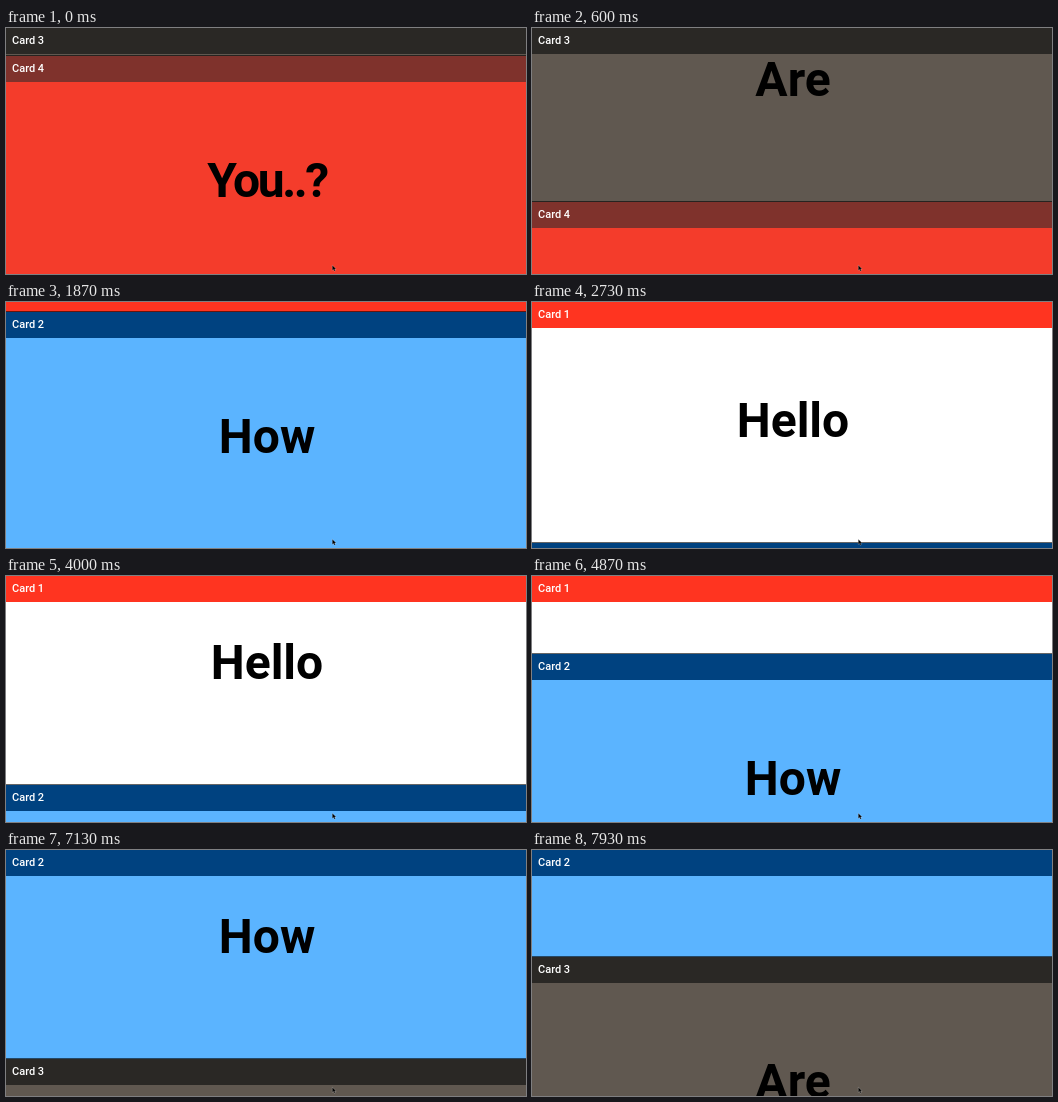
These frames come from a looping animation (520x246 px, 8000 ms). An HTML page:

```html
<!DOCTYPE html>
<html lang="en">
<head>
<meta charset="utf-8">
<title>Sticky cards</title>
<style>
  html, body { margin: 0; width: 100%; height: 100%; overflow: hidden; background: #fff; }
  svg { display: block; width: 520px; height: 246px; }
  text { font-family: Roboto, "Open Sans", sans-serif; }
  .label { font-size: 11px; font-weight: 500; fill: #fff; }
  .word { font-size: 48px; font-weight: 600; text-anchor: middle; fill: #000; }
</style>
</head>
<body>
<svg id="stage" viewBox="0 0 520 246"></svg>
<script>
const WIDTH = 520, CARD = 247, HEADER = 26, LOOP = 8000, RATE = 15;
const stage = document.getElementById('stage');

function add(parent, tag, attrs = {}, text = '') {
  const node = document.createElementNS('http://www.w3.org/2000/svg', tag);
  for (const key in attrs) node.setAttribute(key, attrs[key]);
  node.textContent = text;
  return parent.appendChild(node);
}

const cards = [
  { word: 'Hello', bar: '#ff3420', body: '#ffffff' },
  { word: 'How', bar: '#004280', body: '#5bb4ff' },
  { word: 'Are', bar: '#2a2825', body: '#605850' },
  { word: 'You..?', bar: '#7f322c', body: '#f43c2b', spacing: -2.4 }
].map(({ word, bar, body, spacing = 0 }, i) => {
  const group = add(stage, 'g');
  add(group, 'rect', { width: WIDTH, height: CARD, fill: body });
  add(group, 'text', { class: 'word', x: 261, y: 141, 'letter-spacing': spacing }, word);
  const header = add(group, 'g');
  add(header, 'rect', { y: -1, width: WIDTH, height: 1, fill: '#000', opacity: 0.6 });
  add(header, 'rect', { width: WIDTH, height: HEADER, fill: bar });
  add(header, 'text', { class: 'label', x: 6, y: 16 }, `Card ${i + 1}`);
  return { group, header };
});

add(stage, 'path', {
  d: 'M326.3 237.2v5.2l1.2-1 .9 1.9 1-.5-.8-1.8h1.6z',
  fill: '#000', stroke: '#fff', 'stroke-width': 0.5, 'stroke-opacity': 0.45
});

// Scroll position over time: [ms, px]
const scroll = [
  [0, 713], [867, 498], [1200, 400], [1867, 237], [2600, 22], [2733, 6], [3000, 0],
  [3600, 0], [4000, 38], [4467, 153], [5333, 184], [5733, 210], [5866, 210],
  [5933, 218], [6733, 242], [7600, 352], [7933, 387]
];
const slopes = scroll.slice(1).map(([t, s], i) => (s - scroll[i][1]) / (t - scroll[i][0]));
const tangents = scroll.map((_, i) => {
  const a = slopes[i - 1] ?? slopes[i], b = slopes[i] ?? a;
  return a * b > 0 ? 2 * a * b / (a + b) : 0;
});

// Monotone cubic interpolation between the scroll points
function scrollAt(time) {
  const next = scroll.findIndex(([t]) => t > time);
  if (next < 0) return scroll[scroll.length - 1][1];
  const i = next - 1;
  const [t0, s0] = scroll[i], [t1, s1] = scroll[next];
  const span = t1 - t0, u = (time - t0) / span, v = 1 - u;
  return s0 * v * v * (1 + 2 * u) + s1 * u * u * (3 - 2 * u)
    + span * u * v * (tangents[i] * v - tangents[next] * u);
}

function draw(time) {
  const step = Math.min(Math.floor(time * RATE / 1000 + 0.1), LOOP * RATE / 1000 - 1);
  const offset = Math.round(scrollAt(step * 1000 / RATE));
  cards.forEach(({ group, header }, i) => {
    const top = i * CARD - offset;
    const stick = Math.min(Math.max(-top, 0), CARD - HEADER);
    group.setAttribute('transform', `translate(0 ${top})`);
    header.setAttribute('transform', `translate(0 ${stick})`);
  });
}

const start = performance.now();
function tick() {
  draw((performance.now() - start) % LOOP);
  requestAnimationFrame(tick);
}
draw(0);
requestAnimationFrame(tick);
</script>
</body>
</html>
```
